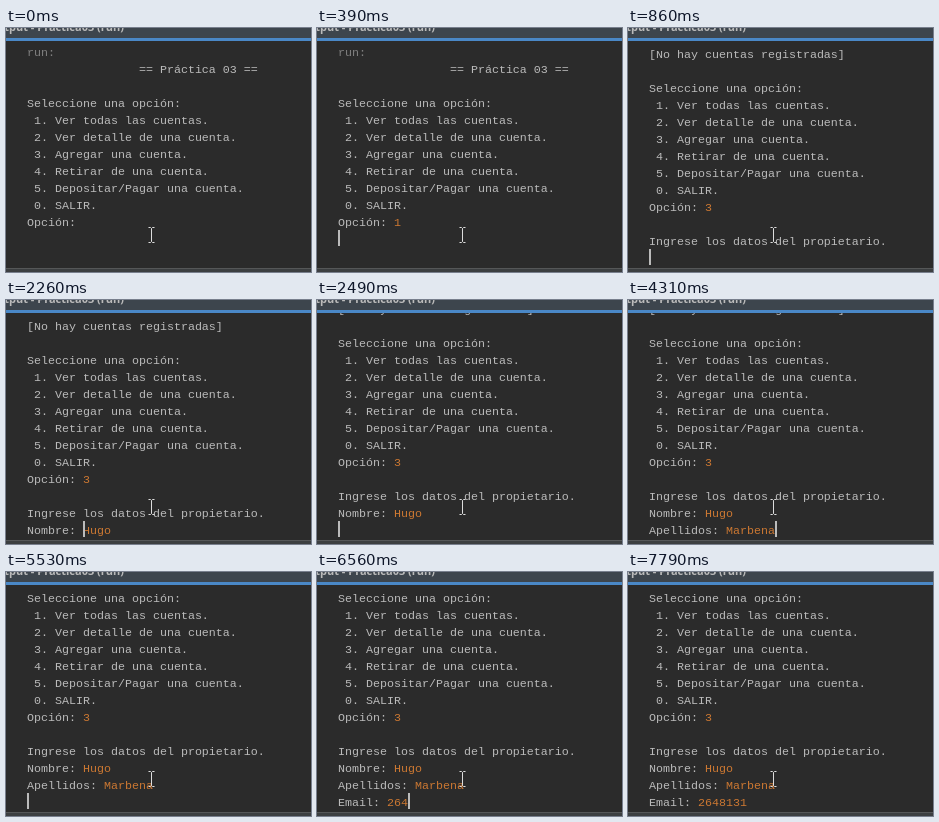
An HTML page for the animation above (8 s loop, 305 px wide and 244 px high).

```html
<!DOCTYPE html>
<html lang="es">
<head>
<meta charset="utf-8">
<title>Consola</title>
<style>
  html, body { margin: 0; width: 100%; height: 100%; overflow: hidden; background: #2b2b2b; }
  #stage { position: absolute; left: 0; top: 0; width: 305px; height: 244px; overflow: hidden; background: #2b2b2b; }
  #stage > *, #view > * { position: absolute; }
  #bar { left: 0; top: 0; width: 305px; height: 10px; background: #3d454d; border-bottom: 3px solid #4a88c7; }
  #tab { right: 187px; top: -9px; white-space: pre; color: #bbb; font: bold 11px/16px "Open Sans", sans-serif; }
  #foot { left: 0; top: 240px; width: 305px; height: 3px; background: #3c3f41; border-top: 1px solid #555758; }
  #view { left: 0; top: 13px; width: 305px; height: 227px; overflow: hidden; }
  #log { left: 21px; margin: 2px 0 0; color: #bbb; font: 11.667px/17px "Liberation Mono", monospace; }
  #log i { font-style: normal; color: #cc7832; }
  #log u { text-decoration: none; color: #808080; }
  #caret { width: 2px; height: 16px; background: #bbb; }
  #mouse { left: 141px; top: 199px; }
</style>
</head>
<body>
<div id="stage">
  <div id="bar"></div>
  <div id="tab">Output - Practica03 (run)</div>
  <div id="view"><pre id="log"></pre><div id="caret"></div></div>
  <div id="foot"></div>
  <svg id="mouse" width="9" height="16"><path d="M1.5 .5h2l1 1 1-1h2M4.5 1.5v13M1.5 15.5h2l1-1 1 1h2" fill="none" stroke="#ddd"/></svg>
</div>
<script>
const LOOP = 8000, CHAR = 7, ROW = 17, LEFT = 21, VIEW_TOP = 13;
const MENU = `Seleccione una opción:
 1. Ver todas las cuentas.
 2. Ver detalle de una cuenta.
 3. Agregar una cuenta.
 4. Retirar de una cuenta.
 5. Depositar/Pagar una cuenta.
 0. SALIR.
Opción: `;

// Each step: time, text appended, caret offset from the end (null = hidden)
const steps = [];
const add = (time, text = '', caret = 0) => steps.push({ time, text, caret });
const type = (word, ...times) => times.forEach((t, i) => add(t, `<i>${word[i]}</i>`));

add(0, `<u>run:</u>\n${' '.repeat(16)}== Práctica 03 ==\n\n${MENU}`, null);
type('1', 180);
add(320, '\n');
add(450, `\n[No hay cuentas registradas]\n\n${MENU}`);
type('3', 590);
add(720, '\n');
add(860, '\nIngrese los datos del propietario.\n');
add(940, 'Nombre: ');
type('Hugo', 1060, 1170, 1340, 1570);
add(2030, '', null);
add(2260, '', -4);
add(2490, '\n');
add(2780, 'Apellidos: ');
type('Marbena', 2960, 3270, 3440, 3600, 3750, 3910, 4310);
add(4840, '', null);
add(5300, '', -7);
add(5530, '\n');
add(5760, 'Email: ');
add(5920, '', null);
type('2648131', 6080, 6240, 6560, 6790, 7090, 7210, 7330);
add(7790, '', null);

const log = document.getElementById('log');
const caret = document.getElementById('caret');
let shown = 0;

function show(count) {
  const html = steps.slice(0, count).map(s => s.text).join('');
  const lines = html.replace(/<[^>]*>/g, '').split('\n');
  const last = lines.length - 1;
  const top = Math.min(15, 238 - ROW * lines.length) - VIEW_TOP;
  const offset = steps[count - 1].caret;
  log.innerHTML = html;
  log.style.top = top + 'px';
  caret.hidden = offset === null;
  caret.style.left = LEFT + CHAR * (lines[last].length + offset) + 'px';
  caret.style.top = top + ROW * last + 'px';
}

function frame() {
  const t = performance.now() % LOOP;
  const count = steps.filter(s => s.time <= t).length;
  if (count !== shown) show(shown = count);
  requestAnimationFrame(frame);
}
frame();
</script>
</body>
</html>
```
